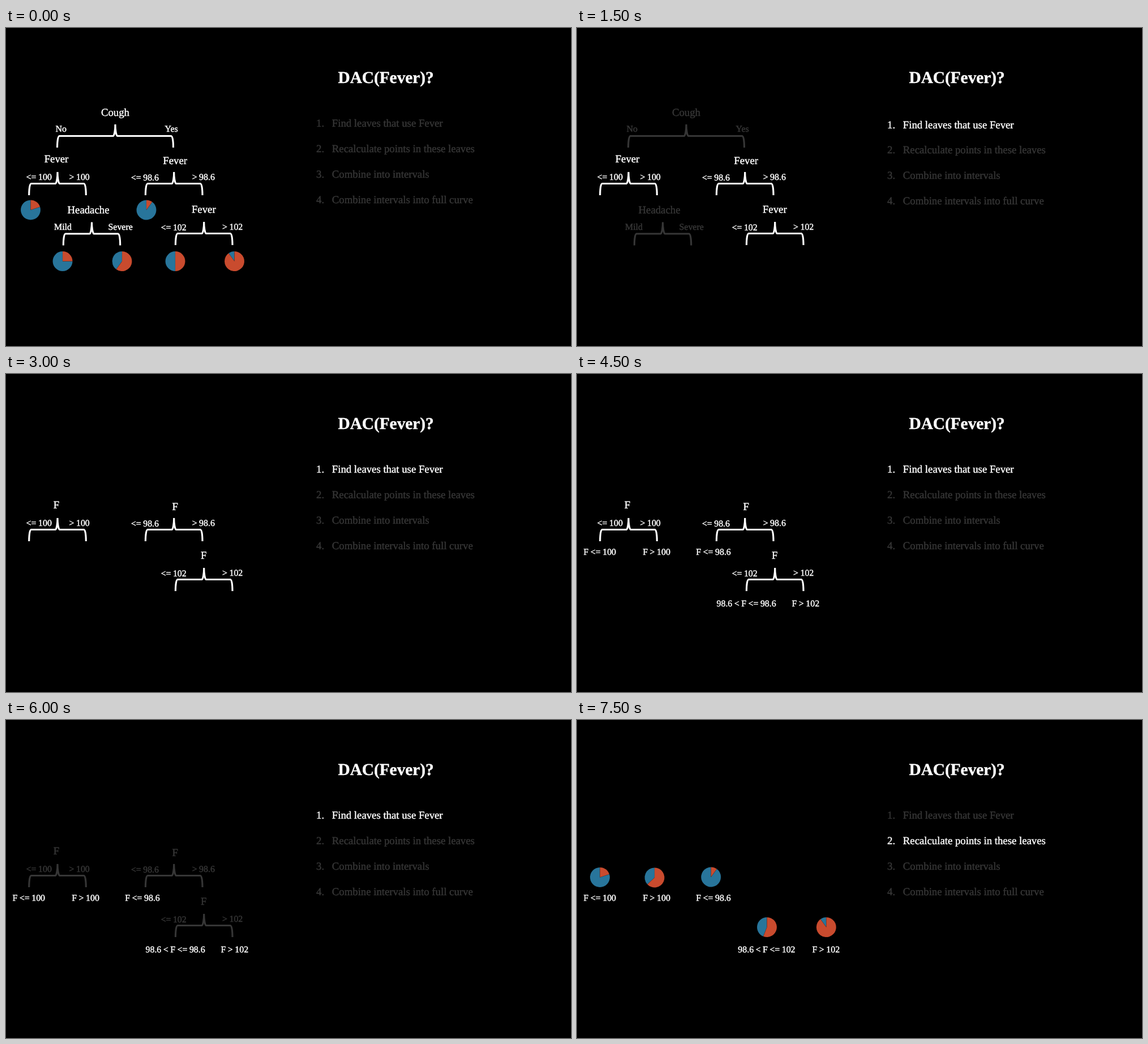
Write an HTML page that moves like this. It is 998 px wide and 561 px high and loops after 8 s.

```html
<!DOCTYPE html>
<html lang="en">
<head>
<meta charset="utf-8">
<title>DAC(Fever)?</title>
<style>
  html, body { margin: 0; width: 100%; height: 100%; overflow: hidden; background: #000; }
  svg { display: block; width: 998px; height: 561px; }
  text {
    font-family: "Liberation Serif", "Times New Roman", serif;
    white-space: pre; text-rendering: geometricPrecision; stroke-width: .45px;
  }
  .label { word-spacing: -.5px; }
</style>
</head>
<body>
<svg id="stage" viewBox="0 0 998 561"></svg>
<script>
const STEP = 1500, LOOP = 8000;
const WHITE = '#fff', DIM = '#363636', BLUE = '#28759b', RED = '#c94b2e';
const LARGE = 18.75, SMALL = 15.9;

const text = (str, x, y, size, color, extra = '') =>
  `<text x="${x}" y="${y}" font-size="${size}" fill="${color}" stroke="${color}" ${extra}>${
    str.replace(/</g, '&lt;').replace(/>/g, '&gt;')}</text>`;

const label = (str, x, y, color = WHITE) => text(str, x, y, SMALL, color, 'class="label"');

// Curly brace lying on its side, pointing up at (x, y).
const brace = (x, y, w, color) =>
  `<path transform="translate(${x} ${y})" fill="none" stroke="${color}" stroke-width="3.1" d="
    M${-w} 41 C${-w} 31 ${1 - w} 20.5 ${4 - w} 20.5 H-4 C-1.5 20.5 0 9 0 0
    C0 9 1.5 20.5 4 20.5 H${w - 4} C${w - 1} 20.5 ${w} 31 ${w} 41"/>`;

// Red share runs clockwise from twelve o'clock.
function pie([x, y, share]) {
  const r = 17.5, a = share * 2 * Math.PI;
  const px = r * Math.sin(a), py = -r * Math.cos(a);
  const slice = (color, sweep, large) =>
    `<path fill="${color}" d="M0 0V${-r}A${r} ${r} 0 ${+large} ${sweep} ${px} ${py}Z"/>`;
  return `<g transform="translate(${x} ${y})" stroke="#000" stroke-opacity=".12" stroke-width=".6">
    ${slice(BLUE, 0, share < .5)}${slice(RED, 1, share > .5)}</g>`;
}

// title, title x, title y, brace x, brace y, half width, [left, x, y], [right, x, y]
const otherNodes = [
  ['Cough', 193, 154.8, 193, 170, 102.5, ['No', 87.5, 183], ['Yes', 280.5, 183]],
  ['Headache', 145.5, 327, 151.5, 342.5, 50.2, ['Mild', 85, 356], ['Severe', 180.5, 355.5]],
];
const feverNodes = [
  ['Fever', 89, 237, 91, 254, 50.3, ['<= 100', 35.6, 268], ['> 100', 111.5, 268]],
  ['Fever', 298.7, 239.5, 296.7, 254, 50.3, ['<= 98.6', 220.8, 269], ['> 98.6', 328.7, 268]],
  ['Fever', 349.3, 326, 349.7, 342, 50.3, ['<= 102', 273.5, 357], ['> 102', 382, 356]],
];

const node = (color, short) => ([name, x, y, bx, by, w, left, right]) =>
  text(short ? name[0] : name, x, y, LARGE, color, 'text-anchor="middle"') +
  brace(bx, by, w, color) + label(...left, color) + label(...right, color);

const each = (items, draw) => items.map(item => draw(item)).join('');

const treePies = [
  [43.5, 321, .2], [248, 321, .1], [100, 411.5, .25],
  [205, 411.5, .6], [299, 411.5, .5], [403.5, 411.5, .9],
];
const leafPies = [
  [40.5, 277.5, .2], [137, 278, .63], [236.7, 277, .1], [335.5, 365.5, .56], [440.3, 365.5, .9],
];

const upperLeaves = () =>
  label('F <= 100', 11.5, 318.5) + label('F > 100', 116.3, 318.5) + label('F <= 98.6', 210.3, 318.5);

const leaves = () =>
  upperLeaves() + label('98.6 < F <= 98.6', 246.5, 410) + label('F > 102', 379.5, 409.5);

const scenes = [
  () => each([...otherNodes, ...feverNodes], node(WHITE)) + each(treePies, pie),
  () => each(otherNodes, node(DIM)) + each(feverNodes, node(WHITE)),
  () => each(feverNodes, node(WHITE, true)),
  () => each(feverNodes, node(WHITE, true)) + leaves(),
  () => each(feverNodes, node(DIM, true)) + leaves(),
  () => each(leafPies, pie) + upperLeaves() +
    label('98.6 < F <= 102', 284.3, 410) + label('F > 102', 415.5, 409.5),
];

const instructions = [
  'Find leaves that use Fever',
  'Recalculate points in these leaves',
  'Combine into intervals',
  'Combine intervals into full curve',
];
const activeItem = [-1, 0, 0, 0, 0, 1];

function panel(scene) {
  const top = scene === 1 ? 176.5 : 174;
  return text('DAC(Fever)?', 586.5, 97.3, 29.3, WHITE, 'font-weight="bold"') +
    instructions.map((line, i) => {
      const color = i === activeItem[scene] ? WHITE : DIM, y = top + i * 44.9;
      return text(`${i + 1}.`, 548, y, LARGE, color) + text(line, 575.8, y, LARGE, color);
    }).join('');
}

const stage = document.getElementById('stage');
const start = performance.now();
let shown = -1;

function frame() {
  const scene = Math.floor((performance.now() - start) % LOOP / STEP);
  if (scene !== shown) {
    stage.innerHTML = scenes[scene]() + panel(scene);
    shown = scene;
  }
  requestAnimationFrame(frame);
}
frame();
</script>
</body>
</html>
```
